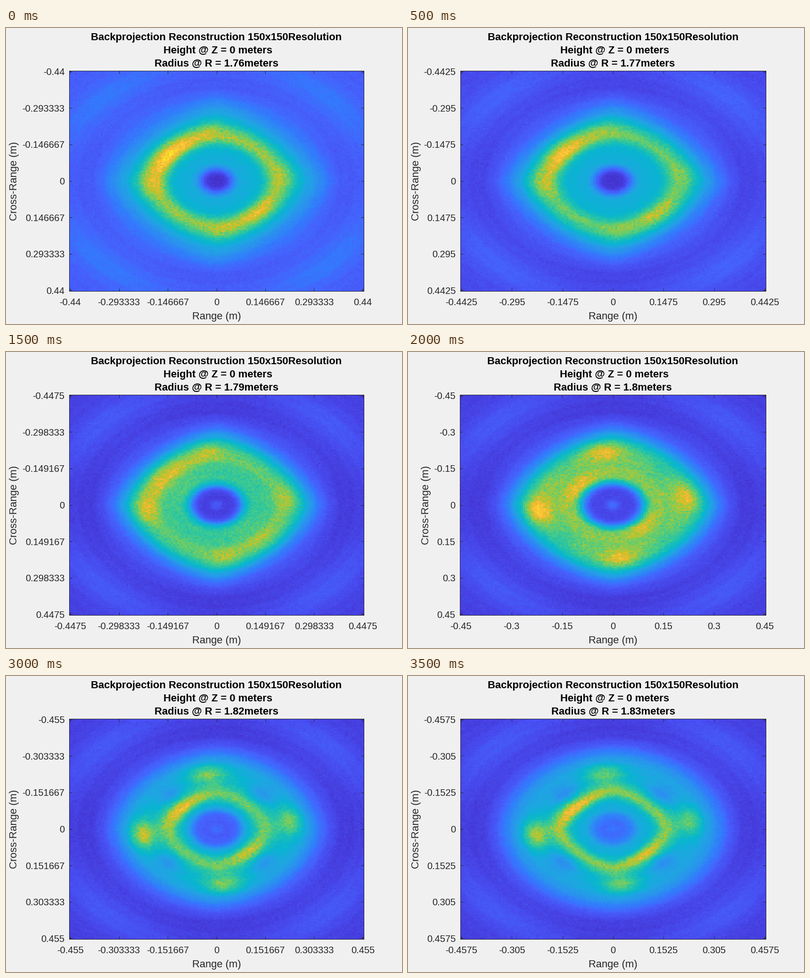
A matplotlib script that plays this animation: 840 by 630 pixels, repeating every 4 s.

```python
import numpy as np
import matplotlib.pyplot as plt
from matplotlib.animation import FuncAnimation
from matplotlib.colors import LinearSegmentedColormap

W, H, N = 840, 630, 150
TOP, BOTTOM, RIGHT = 91, 560, 759
STEPS = 8
INK = "#262626"
plt.rcParams["font.family"] = "Liberation Sans"

PARULA = ["#3e26a8", "#4537d5", "#484df0", "#4563fd", "#327cfc", "#2b91ef",
          "#20a5e3", "#08b5d0", "#19bfb6", "#37c897", "#64cd6f", "#9dc943",
          "#d1bf27", "#f8ba3d", "#fccf30", "#f5e924", "#f9fb15"]
stops = np.append(np.arange(0, 61, 4), 63) / 63
cmap = LinearSegmentedColormap.from_list("parula", list(zip(stops, PARULA)), N=256)

axis = (np.arange(N) + 0.5) / N * 2 - 1
U, V = np.meshgrid(axis, axis)
RHO = np.hypot(U, V)
THETA = np.arctan2(-V, U)
DIAMOND = (np.abs(U) ** 1.45 + np.abs(V) ** 1.45) ** (1 / 1.45)

UPPER_LEFT, LOWER_RIGHT = 143, -46
COMPASS = [186, 97, 8, -84]
DIAGONALS = [45, 135, 223, -43]


def bell(x, width):
    return np.exp(-(x / width) ** 2)


def step(x, edge, soft):
    return 1 / (1 + np.exp((edge - x) / soft))


def lobe(angle, spread):
    turn = (np.degrees(THETA) - angle + 180) % 360 - 180
    return bell(turn, spread)


def ring(r, radius, inner, outer):
    return bell(r - radius, np.where(r < radius, inner, outer))


def backdrop(i):
    """Blue surroundings: darker along the axes, lighter towards the diagonals."""
    z = .12 + .085 * np.exp(-i / .9) - .07 * np.clip(DIAMOND - 1.1, 0, .5)
    z = z - .025 * bell(RHO - .85, .1) - .03 * np.cos(2 * THETA) ** 2 * step(RHO, .75, .05)
    return z + .05 * np.sin(2 * THETA) ** 2 * bell(RHO - 1.08, .1)


def scene(i):
    # The outer ring gives way to an inner one as the radius grows
    t = np.clip((i - 2) / 3, 0, 1)
    fade = t * t * (3 - 2 * t)
    g = (i / 7) ** 2
    mix = np.interp(RHO, [.2, .35, .6], [.6 * g, .2 + .8 * g, 1 - .8 * g])
    r = RHO + (DIAMOND - RHO) * mix

    base = backdrop(i)
    level = .42 + .21 * bell(i - 4, 1.6)
    edge = .64 + .06 * (i / 3.5 - 1) ** 2
    z = base + (level - base) * step(-r, -edge, .06)

    arcs = lobe(UPPER_LEFT, 32)
    outer = .27 * max(0, 1 - i / 4.5) + .22 * (1 - fade) * (arcs + .5 * lobe(LOWER_RIGHT, 24))
    inner = .005 * i * i * fade + .18 * fade * (arcs + .7 * lobe(LOWER_RIGHT, 24))
    z += outer * ring(r, .41 + .015 * i, .08, .12)
    z += inner * ring(r, .2 + .021 * i, .06, .08)

    for angle in COMPASS:
        gain = (.06 + .16 * fade) * (1.4 if angle == COMPASS[0] else 1)
        z += gain * lobe(angle, 14) * bell(RHO - .47 - .005 * i, .08)
    for angle in DIAGONALS:
        z -= .11 * fade ** 2 * lobe(angle, 14) * bell(RHO - .44, .08)

    floor = .04 + .0035 * i * i + .12 * bell(i - 4, 2) * bell(RHO, .05)
    hole = .1 + .1 * bell(i - 4.5, 2.6)
    z = floor + (z - floor) * step(RHO, hole, .022)

    grain = np.random.default_rng(i).normal(size=z.shape)
    return z + .005 * np.sin(RHO * 80) + grain * (.008 + .08 * np.clip(z - .42, 0, .3))


fig = plt.figure(figsize=(W / 100, H / 100), dpi=100, facecolor="#f0f0f0")


def put(x, y, text, px, ha="center", color=INK, **style):
    fig.text(x / W, 1 - y / H, text, fontsize=px * .72, ha=ha, va="baseline",
             color=color, **style)


def draw(i):
    fig.clear()
    radius = round(1.76 + .01 * i, 2)
    labels = [f"{radius / 4 * k / 3:g}" for k in range(-3, 4)]
    digits = len(labels[4])
    left = {8: 134, 6: 111}.get(digits, 110)
    width, height = RIGHT - left, BOTTOM - TOP
    mid = (left + RIGHT) / 2

    ax = fig.add_axes([left / W, 1 - BOTTOM / H, width / W, height / H])
    ax.imshow(scene(i), cmap=cmap, vmin=0, vmax=1, aspect="auto",
              interpolation="nearest", extent=(.5, N + .5, N + .5, .5))
    ticks = np.linspace(1, N, 7)
    ax.set_xticks(ticks)
    ax.set_yticks(ticks)
    ax.tick_params(direction="in", length=4.5, width=.72, color=INK, top=True,
                   right=True, labelbottom=False, labelleft=False)
    for spine in ax.spines.values():
        spine.set(linewidth=.72, edgecolor=INK)

    for t, text in zip((ticks - .5) / N, labels):
        put(left + t * width, 590, text, 20)
        put(left - 9.5, TOP + t * height + 7.5, text, 20, ha="right")

    bold = dict(px=22, weight="bold", color="black")
    put(mid, 26, "Backprojection Reconstruction 150x150Resolution", **bold)
    put(mid + 3, 54, "Height @ Z = 0 meters", **bold)
    put(mid, 82, f"Radius @ R = {radius:g}meters", **bold)
    put(mid, 620, "Range (m)", 22)
    put(44 if digits < 6 else 23, 325.5, "Cross-Range (m)", 22,
        rotation=90, rotation_mode="anchor")


anim = FuncAnimation(fig, draw, frames=STEPS, interval=500, repeat=True, repeat_delay=0)
plt.show()
```
